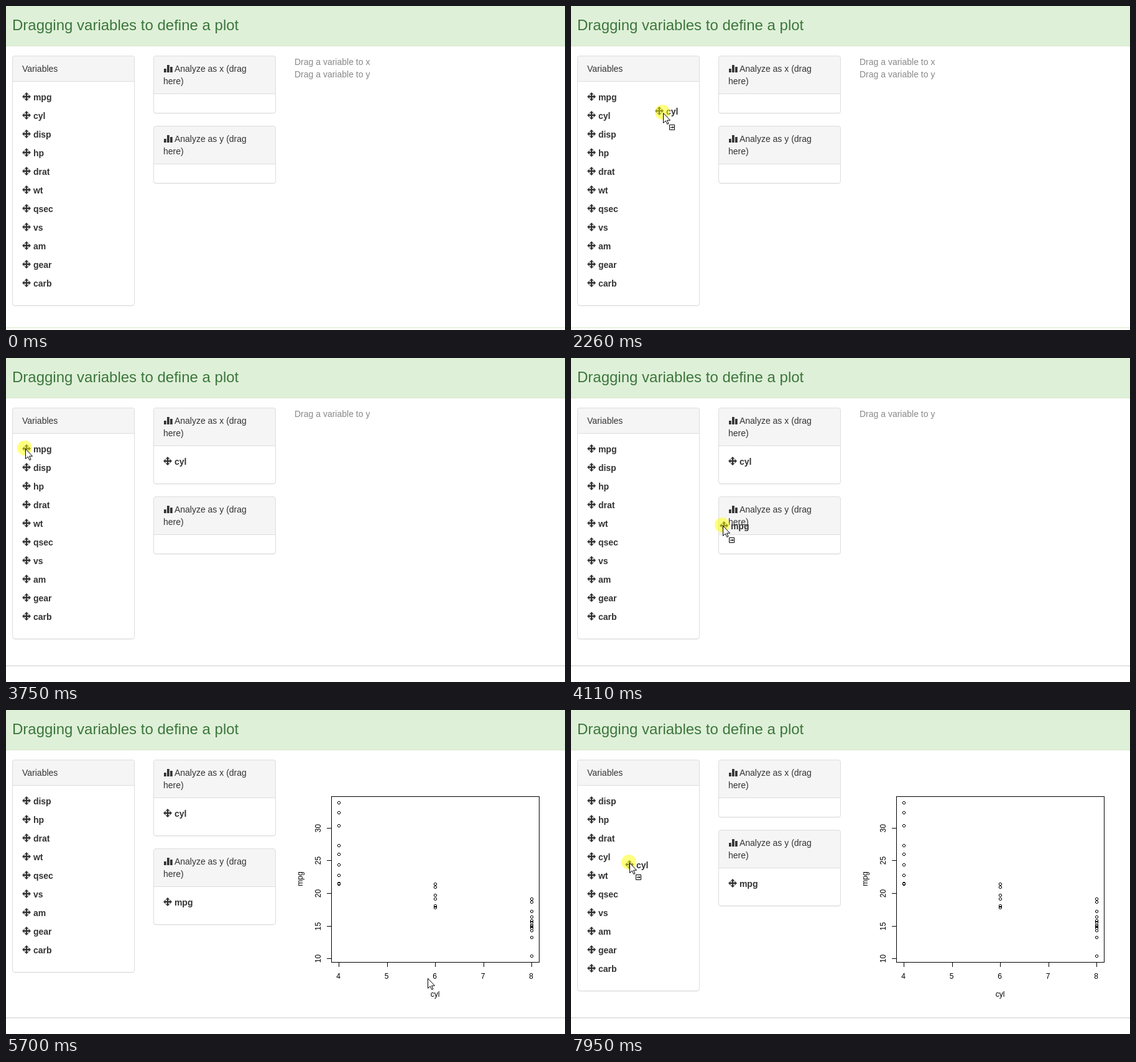
Animation, 899 px wide and 522 px high, one loop 8 s. Source, as an HTML page:

```html
<!DOCTYPE html>
<html lang="en">
<head>
<meta charset="utf-8">
<title>Dragging variables to define a plot</title>
<style>
  html, body { margin: 0; width: 100%; height: 100%; overflow: hidden; background: #fff; }
  svg { display: block; font: 14px "Liberation Sans", Arial, sans-serif; fill: #333; }
  .title { font-size: 24px; fill: #3c763d; }
  .item { font-weight: bold; }
  .hint { fill: #888; }
  .plot { font-size: 12px; fill: #000; text-anchor: middle; }
  .plot path, .plot circle { fill: none; stroke: #000; shape-rendering: crispEdges; }
</style>
</head>
<body>
<svg id="stage" width="899" height="522" viewBox="0 0 899 522"></svg>
<script>
const LOOP = 8000;
const STEP = 78; // the pointer is sampled about this often, in ms
const VARIABLES = ['mpg', 'cyl', 'disp', 'hp', 'drat', 'wt', 'qsec', 'vs', 'am', 'gear', 'carb'];

// mtcars fuel economy by cylinder count
const MPG_BY_CYL = {
  4: [22.8, 24.4, 32.4, 30.4, 33.9, 21.5, 27.3, 26, 21.4],
  6: [21, 21.4, 18.1, 19.2, 17.8, 19.7],
  8: [18.7, 14.3, 16.4, 17.3, 15.2, 10.4, 14.7, 15.5, 13.3, 19.2, 15.8, 15],
};

// Each move starts where the one before it ended; home is where a dragged item is picked up.
const MOVES = [
  { from: 610, to: 1260, end: [46, 150] },
  { from: 1410, to: 1960, end: [39, 179] },
  { from: 2100, to: 2660, end: [262, 164], drag: 'cyl', home: [26, 182] },
  { from: 2870, to: 3510, end: [31, 146] },
  { from: 3750, to: 4340, end: [279, 290], drag: 'mpg', home: [26, 152] },
  { from: 4590, to: 4590, end: [279, 290] },
  { from: 4750, to: 5060, end: [360, 341] },
  { from: 5310, to: 5580, end: [744, 503] },
  { from: 5580, to: 5850, end: [650, 402] },
  { from: 6580, to: 7080, end: [260, 163] },
  { from: 7420, to: 7950, end: [94, 246], drag: 'cyl', home: [253, 172] },
];
MOVES.forEach((m, i) => m.start = i ? MOVES[i - 1].end : [356, 466]);

const stage = document.getElementById('stage');
const text = (x, y, s, attrs = '') => `<text x="${x}" y="${y}" ${attrs}>${s}</text>`;
const rect = (x, y, w, h, fill = '#333') => `<rect x="${x}" y="${y}" width="${w}" height="${h}" fill="${fill}"/>`;

function item(x, y, name) {
  const arm = 'M-1.2 0V-3.5H-3.5L0-7 3.5-3.5H1.2V0z';
  const arms = [0, 90, 180, 270].map(a => `<path d="${arm}" transform="rotate(${a})"/>`).join('');
  return `<g transform="translate(${x + 7} ${y - 6})">${arms}</g>` + text(x + 17.9, y, name, 'class="item"');
}

function panel(x, y, headHeight, names, heading) {
  const body = y + headHeight;
  const h = headHeight + 31 + 30 * names.length;
  const frame = (dy, attrs) =>
    `<rect x="${x + .5}" y="${y + .5 + dy}" width="196" height="${h - 1}" rx="3.5" ${attrs}/>`;
  return frame(1, 'fill="none" stroke="#000" stroke-opacity=".05"')
    + frame(0, 'fill="#fff"')
    + `<path d="M${x + .5} ${body - 1}V${y + 4}q0-3.5 3.5-3.5h189q3.5 0 3.5 3.5V${body - 1}z" fill="#f5f5f5"/>`
    + rect(x, body - 1, 197, 1, '#ddd')
    + frame(0, 'fill="none" stroke="#ddd"')
    + heading
    + names.map((name, i) => item(x + 16, body + 30 + 30 * i, name)).join('');
}

function axisPanel(y, axis, names) {
  const bars = [6, 12, 9].map((h, i) => rect(254 + 5 * i, y + 27 - h, 3.7, h)).join('');
  return panel(237, y, 62, names,
    bars + text(270.9, y + 26, `Analyze as ${axis} (drag`) + text(253, y + 46, 'here)'));
}

function plot() {
  const px = c => 535.5 + 77.5 * (c - 4);
  const py = m => Math.round(400.4 - 10.53 * (m - 10)) + .5;
  const upright = (x, y, s) => text(0, 0, s, `transform="translate(${x} ${y}) rotate(-90)"`);
  let out = '<path d="M523.5 139.5h334v267h-334z"/>';
  for (let c = 4; c <= 8; c++)
    out += `<path d="M${px(c)} 406v7.5"/>` + text(px(c) - 1, 433, c);
  for (let m = 10; m <= 30; m += 5)
    out += `<path d="M523 ${py(m)}h-7.5"/>` + upright(506, py(m), m);
  for (const c in MPG_BY_CYL)
    for (const m of MPG_BY_CYL[c]) out += `<circle cx="${px(c)}" cy="${py(m)}" r="2"/>`;
  return `<g class="plot">${out}${text(690, 462, 'cyl')}${upright(477, 272, 'mpg')}</g>`;
}

function pointerAt(t) {
  const move = MOVES.findLast(m => t >= m.from);
  if (!move) return null;
  const span = move.to - move.from;
  const steps = Math.max(1, Math.round(span / STEP));
  const progress = span ? Math.min(1, Math.floor((t - move.from) / span * steps + .3) / steps) : 1;
  const eased = 1 - (1 - progress) ** (move.drag ? 2 : 3);
  const [x, y] = move.start.map((v, k) => Math.round(v + (move.end[k] - v) * eased));
  return { x, y, move, moved: progress > 0 };
}

function drawPointer({ x, y, move, moved }) {
  const { drag, home, start } = move;
  const within = (x0, x1, y0, y1) => x > x0 && x < x1 && y > y0 && y < y1;
  const overText = !drag && (within(43, 75, 137, 165) || within(269, 301, 285, 320));
  let out = '';
  if (drag) {
    if (moved) out += item(home[0] + x - start[0], home[1] + y - start[1], drag);
    out += `<circle cx="${x - 1}" cy="${y - 1}" r="12" fill="#ff0" fill-opacity=".5"/>`;
  }
  const shape = overText
    ? '<path d="M-3 -7.5h2.5l1 1 1-1H4M.5-6.5v14M-3 8.5h2.5l1-1 1 1H4" fill="none" stroke="#000"/>'
    : '<path d="M.5.5v16l3.7-3.5 2.6 5.5 2.2-1-2.5-5.3h5z" fill="#fff" stroke="#000"/>';
  const badge = drag && moved
    ? '<path d="M10.5 19.5h8v8h-8z" fill="#fff" stroke="#000"/><path d="M12 23.5h5m-2-2l2 2-2 2" fill="none" stroke="#000"/>'
    : '';
  return out + `<g transform="translate(${x} ${y})">${shape}${badge}</g>`;
}

function draw(t) {
  const p = pointerAt(t);
  const returned = t >= 7420 && p.x < 192;
  const cylOnX = !returned && (t >= 2870 || t >= 2100 && p.x > 237);
  const mpgOnY = t >= 4590 || t >= 3750 && p.y > 270;
  const cylTaken = cylOnX || returned;
  const list = VARIABLES.filter(v => !(v === 'cyl' && cylTaken) && !(v === 'mpg' && mpgOnY));
  if (returned) list.splice(Math.floor((p.y - 132) / 30), 0, 'cyl');

  const hints = [];
  if (t < 2870) hints.push('x');
  if (t < 4750) hints.push('y');

  return rect(0, 0, 899, 64, '#dff0d8') + rect(0, 64, 899, 1, '#d6e9c6')
    + text(10, 39, 'Dragging variables to define a plot', 'class="title"')
    + panel(10, 80, 42, list, text(26, 106, 'Variables'))
    + axisPanel(80, 'x', cylOnX ? ['cyl'] : [])
    + axisPanel(cylOnX ? 223 : 193, 'y', mpgOnY ? ['mpg'] : [])
    + hints.map((axis, i) => text(464, 95 + 20 * i, `Drag a variable to ${axis}`, 'class="hint"')).join('')
    + (t >= 4750 ? plot() : '')
    + (cylTaken ? rect(0, 495, 899, 1.6, '#ddd') : rect(0, 518, 899, 1, '#d6e9c6'))
    + (p ? drawPointer(p) : '');
}

let shown = '';
function tick() {
  const markup = draw(performance.now() % LOOP);
  if (markup !== shown) stage.innerHTML = shown = markup;
  requestAnimationFrame(tick);
}
tick();
</script>
</body>
</html>
```
